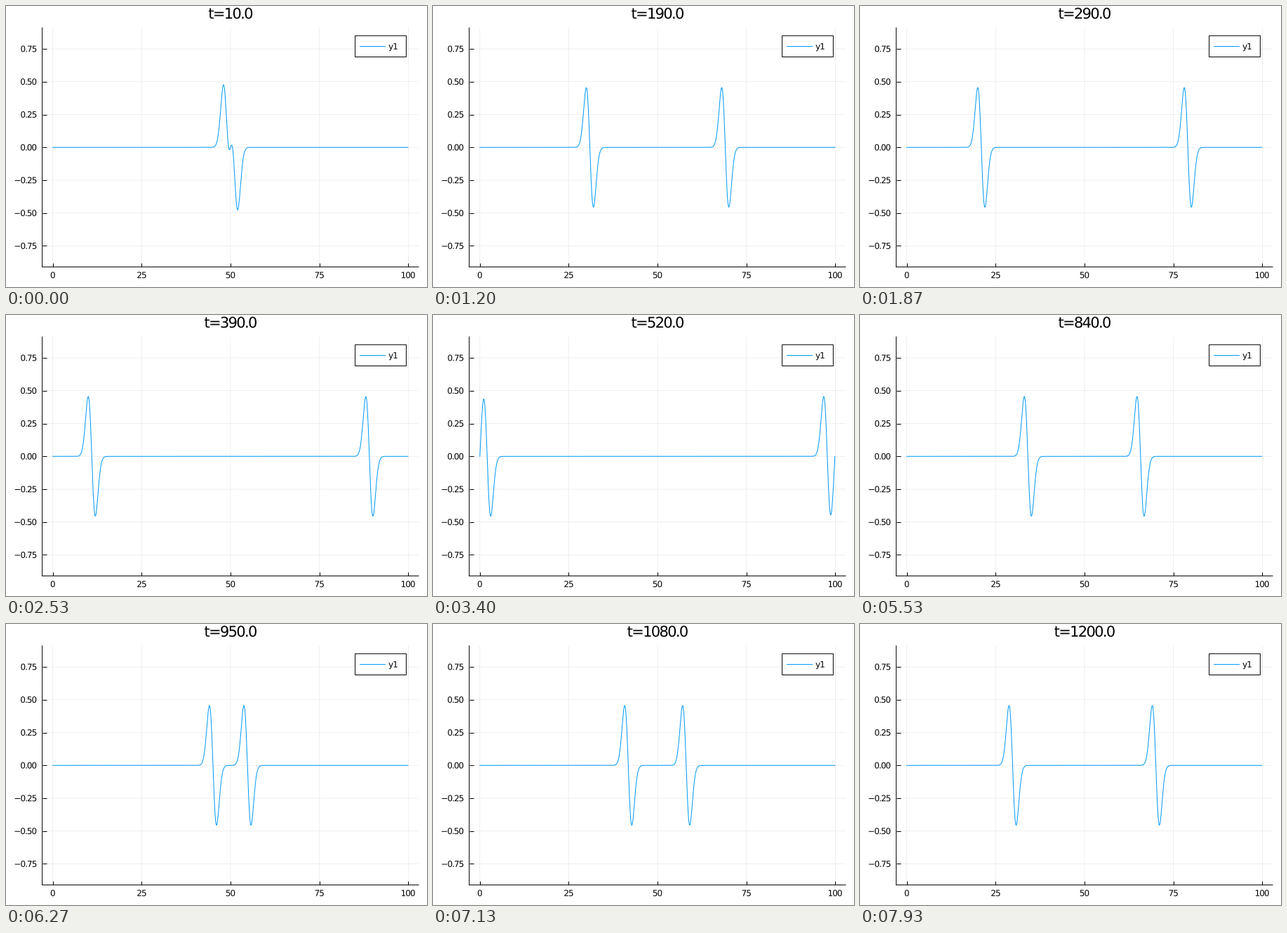
These frames come from a looping animation (600 px wide and 400 px high, 8000 ms). A matplotlib script:

```python
import numpy as np
import matplotlib.pyplot as plt
from matplotlib.animation import FuncAnimation
from matplotlib.lines import Line2D
from matplotlib.patches import PathPatch, Rectangle
from matplotlib.path import Path
from matplotlib.textpath import TextPath
from matplotlib.transforms import Affine2D

W, H, DPI = 600, 400, 100
FRAMES, TICK_MS = 400, 20
STEPS = 120
LENGTH, START = 99.9, 50.0
AMP = np.pi ** -0.25
BLUE = "#009afa"
TRACKING = -0.08  # letter spacing in em

plt.rcParams["font.family"] = "DejaVu Sans"


def pt(px):
    return px * 72 / DPI


fig = plt.figure(figsize=(W / DPI, H / DPI), dpi=DPI, facecolor="white")
# Stage pixels, origin at the top left
stage = Affine2D().scale(1 / W, -1 / H).translate(0, 1) + fig.transFigure

glyphs = {}


def glyph(ch):
    """Outline and advance of one character at size 1."""
    if ch not in glyphs:
        pair = TextPath((0, 0), ch + "|", size=1).get_extents().x1
        bar = TextPath((0, 0), "|", size=1).get_extents().x1
        outline = TextPath((0, 0), ch, size=1)
        glyphs[ch] = (Path(outline.vertices, outline.codes), pair - bar)
    return glyphs[ch]


def text_path(x, y, text, size, align=0.5):
    """Text with baseline y; align 0, 0.5 or 1 puts its left, middle or right at x."""
    pen, parts = 0, []
    for ch in text:
        outline, advance = glyph(ch)
        parts.append(outline.transformed(Affine2D().translate(pen, 0)))
        pen += advance + TRACKING
    path = Path.make_compound_path(*parts)
    box = path.get_extents()
    shift = box.x0 + align * box.width
    return path.transformed(
        Affine2D().translate(-shift, 0).scale(size, -size).translate(x, y))


def label(x, y, text, size=12, align=0.5):
    return fig.add_artist(PathPatch(text_path(x, y, text, size, align),
                                    fc="black", lw=0, snap=False,
                                    transform=stage, zorder=5))


# Plot area in stage pixels
LEFT, RIGHT, TOP, BOTTOM = 51.6, 588, 31.1, 371.4
ax = fig.add_axes([LEFT / W, 1 - BOTTOM / H,
                   (RIGHT - LEFT) / W, (BOTTOM - TOP) / H])
ax.set_xlim(-0.03 * LENGTH, 1.03 * LENGTH)
ax.set_ylim(-0.91, 0.91)
ax.set_axisbelow(True)
ax.set_xticks(range(0, 101, 25))
ax.set_yticks(np.arange(-3, 4) / 4)
ax.grid(True, color="black", alpha=0.1, lw=pt(0.6), snap=False)
ax.tick_params(direction="in", length=pt(5.5), width=pt(1),
               labelbottom=False, labelleft=False)
for side in ("top", "right"):
    ax.spines[side].set_visible(False)
for side in ("left", "bottom"):
    ax.spines[side].set(linewidth=pt(1), snap=False)


def stage_pos(x, y):
    px, py = ax.transData.transform((x, y))
    return px, H - py


for v in range(0, 101, 25):
    label(stage_pos(v, 0)[0], 387.3, str(v))
for v in np.arange(-3, 4) / 4:
    label(43.3, stage_pos(0, v)[1] + 4.3,
          f"{v:.2f}".replace("-", "\u2212"), align=1)

# Legend
fig.add_artist(Rectangle((497.6, 42.3), 72.8, 30.2, fc="white", ec="black",
                         lw=pt(1), snap=False, transform=stage, zorder=3))
fig.add_artist(Line2D([504, 539.5], [57.4, 57.4], color=BLUE, lw=pt(1),
                      transform=stage, zorder=4))
label(545.4, 61.7, "y1", align=0)

title = label(320, 18, "t", 21)
x = np.linspace(0, LENGTH, 1000)
wave, = ax.plot(x, 0 * x, color=BLUE, lw=pt(1), clip_on=False)


def pulse(s):
    return -AMP * s * np.exp(-s * s / 2)


def displacement(t):
    """Two pulses leaving the middle, reflected at fixed ends by mirror images."""
    travel = 0.1 * t + 0.05
    u = np.zeros_like(x)
    for start in (START, -START):
        for way in (-1, 1):
            s = x - start - way * travel
            u += pulse((s + LENGTH) % (2 * LENGTH) - LENGTH)
    return u


def update(i):
    # Each step is held for three or four ticks
    now = i * TICK_MS + 0.7 * TICK_MS
    step = int(now * STEPS / (FRAMES * TICK_MS))
    t = 10.0 * (step + 1)
    wave.set_ydata(displacement(t))
    title.set_path(text_path(320, 18, f"t={t:.1f}", 21))
    return wave, title


anim = FuncAnimation(fig, update, frames=FRAMES, interval=TICK_MS,
                     init_func=lambda: update(0), repeat=True, repeat_delay=0)
plt.show()
```
